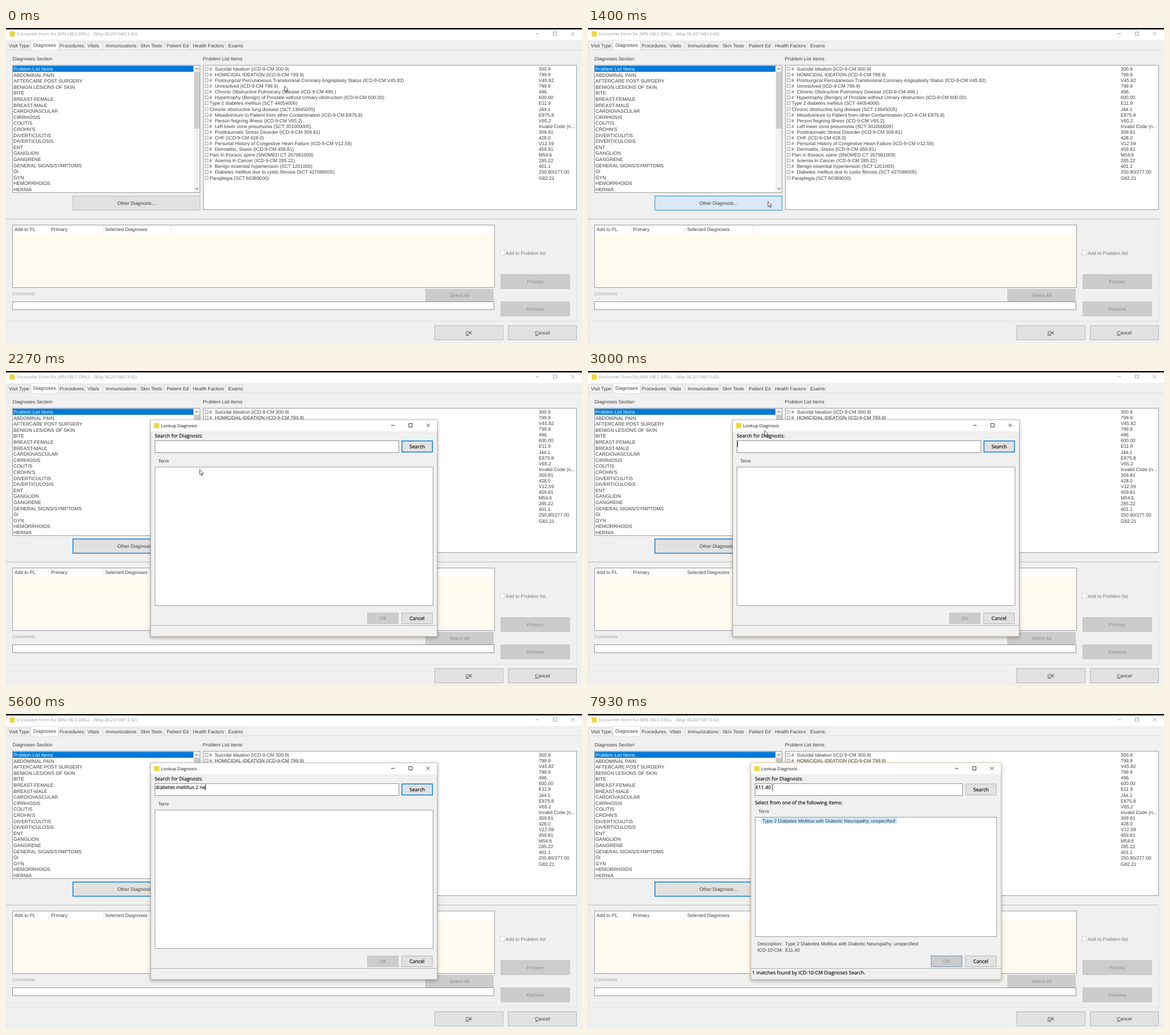
Write an HTML page that moves like this. It is 1011 by 554 pixels and loops after 8000 ms.

```html
<!DOCTYPE html>
<html lang="en">
<head>
<meta charset="utf-8">
<title>Encounter form</title>
<style>
  html, body { margin: 0; width: 100%; height: 100%; overflow: hidden; background: #f0f0f0; }
  svg { display: block; width: 1011px; height: 554px; stroke-width: .8; }
  text { font: 8.4px "Liberation Sans", Arial, sans-serif; fill: #3c3c3c; white-space: pre; text-rendering: geometricPrecision; }
  .ui { font: 8.6px "Open Sans", "Noto Sans", sans-serif; fill: #000; }
  .ui:not(.off) { stroke: #000; stroke-width: .15; }
  .title { font: 7.65px "Open Sans", "Noto Sans", sans-serif; fill: #111; }
  .idle { fill: #999; }
  .caps { font-size: 8.5px; }
  .off { fill: #8c8c8c; }
  .pale { fill: #a6a6a6; }
  .sel { fill: #fff; }
  .mid { text-anchor: middle; }
  .dialog { filter: drop-shadow(0 2px 3px rgba(0, 0, 0, .3)); }
</style>
</head>
<body>
<svg id="stage" viewBox="0 0 1011 554" xmlns="http://www.w3.org/2000/svg"></svg>
<script>
const BLUE = '#0078d7', GREY = '#828790', FACE = '#e1e1e1', EDGE = '#adadad', OFF = '#cccccc';
const LOOP = 8000, STEP = 1000 / 15;

// Shapes are given by their edges: left, top, right, bottom.
const box = (l, t, r, b, fill, stroke = 'none', extra = '') =>
  `<rect x="${l}" y="${t}" width="${r - l}" height="${b - t}" fill="${fill}" stroke="${stroke}" ${extra}/>`;
const text = (x, y, s, cls = '', extra = '') => `<text x="${x}" y="${y}" class="${cls}" ${extra}>${s}</text>`;
const path = (d, stroke, extra = '') => `<path d="${d}" fill="none" stroke="${stroke}" ${extra}/>`;
const button = (l, t, r, b, label, { fill = FACE, edge = EDGE, cls = '', extra = '' } = {}) =>
  box(l + .5, t + .5, r - .5, b - .5, fill, edge, extra) + text((l + r) / 2, (t + b) / 2 + 3, label, 'mid ' + cls);
const disabled = (l, t, r, b, label) => button(l, t, r, b, label, { fill: OFF, edge: '#c2c2c2', cls: 'off' });
const icon = (x, y) => box(x, y, x + 9, y + 9, '#ecd83c');
const controls = (x, y, color) =>
  path(`M${x - 65} ${y}h6M${x - 34} ${y - 3}h6v6h-6zM${x - 3} ${y - 3}l6 6m0-6l-6 6`, color, 'stroke-width=".9"');

const sections = ['Problem List Items', 'ABDOMINAL PAIN', 'AFTERCARE POST SURGERY', 'BENIGN LESIONS OF SKIN', 'BITE',
  'BREAST-FEMALE', 'BREAST-MALE', 'CARDIOVASCULAR', 'CIRRHOSIS', 'COLITIS', "CROHN'S", 'DIVERTICULITIS',
  'DIVERTICULOSIS', 'ENT', 'GANGLION', 'GANGRENE', 'GENERAL SIGNS/SYMPTOMS', 'GI', 'GYN', 'HEMORRHOIDS', 'HERNIA'];

const problems = `# Suicidal Ideation (ICD-9-CM 300.9)|300.9
# HOMICIDAL IDEATION (ICD-9-CM 799.9)|799.9
# Postsurgical Percutaneous Transluminal Coronary Angioplasty Status (ICD-9-CM V45.82)|V45.82
# Unresolved (ICD-9-CM 799.9)|799.9
# Chronic Obstructive Pulmonary Disease (ICD-9-CM 496.)|496.
# Hypertrophy (Benign) of Prostate without Urinary obstruction (ICD-9-CM 600.00)|600.00
Type 2 diabetes mellitus (SCT 44054006)|E11.9
Chronic obstructive lung disease (SCT 13645005)|J44.1
# Misadventure to Patient from other Contamination (ICD-9-CM E875.8)|E875.8
# Person feigning illness (ICD-9-CM V65.2)|V65.2
# Left lower zone pneumonia (SCT 301000005)|Invalid Code (n...
# Posttraumatic Stress Disorder (ICD-9-CM 309.81)|309.81
# CHF (ICD-9-CM 428.0)|428.0
# Personal History of Congestive Heart Failure (ICD-9-CM V12.59)|V12.59
# Dermatitis, Stasis (ICD-9-CM 459.81)|459.81
Pain in thoracic spine (SNOMED CT 267981009)|M54.6
# Anemia In Cancer (ICD-9-CM 285.22)|285.22
# Benign essential hypertension (SCT 1201005)|401.1
# Diabetes mellitus due to cystic fibrosis (SCT 427089005)|250.80/277.00
Paraplegia (SCT 60389000)|G82.21`.split('\n');

const tabs = [['Visit Type', 5, 43], ['Diagnoses', 48, 92], ['Procedures', 94, 139], ['Vitals', 143, 171],
  ['Immunizations', 175, 232], ['Skin Tests', 236, 278], ['Patient Ed', 282, 324],
  ['Health Factors', 328, 385], ['Exams', 390, 417]];

function problemRow(line, i) {
  const y = 72 + i * 10.08, [name, code] = line.split('|'), marked = name[0] === '#';
  return box(349.5, y - 2.8, 354.8, y + 2.5, '#fff', '#777', 'stroke-width=".7"') +
    (marked ? text(357, y + 3, '#', '', 'font-weight="bold"') + text(366.5, y + 3, name.slice(2)) : text(357.5, y + 3, name)) +
    text(935, y + 3, code);
}

function mainWindow() {
  return box(0, 0, 1011, 554, '#f0f0f0') + box(0, 2, 1011, 21, '#fff') + box(0, 0, 1011, 2.5, '#000') +
    icon(6.5, 6) + text(19, 13, 'Encounter Form for JWN VBLS DRILL', 'title idle') +
    text(154, 13, '(May 06,2019@13:42)', 'title idle') + controls(994.5, 10, '#999') +
    path('M.5 24.5H417M.5 24V554M1 38.5H1011', '#d9d9d9') + box(44, 21.5, 92, 39, '#fff', '#d9d9d9') +
    tabs.map(([name, x, end]) => text(x, name === 'Diagnoses' ? 32.5 : 33.5, name) +
      path(`M${end - .5} 24V38`, '#d9d9d9')).join('') +
    text(11.5, 56.5, 'Diagnoses Section') + text(345.5, 56.5, 'Problem List Items') +
    // section list
    box(11.5, 65.5, 340.5, 289.5, '#fff', GREY) + box(12, 66.5, 329, 77, BLUE) +
    sections.map((s, i) => text(13, 75 + i * 10.6, s, i ? 'caps' : 'sel')).join('') +
    box(329.5, 66, 340, 289, '#f0f0f0') + box(330, 77, 340, 177, '#cdcdcd') +
    path('M332.3 73.3l2.7-2.7 2.7 2.7M332.3 281.3l2.7 2.7 2.7-2.7', '#444', 'stroke-width="1"') +
    // problem list
    box(346.5, 65.5, 1001.5, 319.5, '#fff', GREY) + problems.map(problemRow).join('') +
    button(117, 295, 341, 321, 'Other Diagnosis...', { extra: 'id="other"' }) +
    // lower panel
    path('M1 336H1002', '#a9a9a9') + path('M1 515.5H1002V336', '#dcdcdc') +
    box(11.5, 346.5, 857.5, 456.5, '#fffbf0', GREY) + box(12, 347, 857, 361.5, '#fff') +
    path('M75.5 347V361M170.5 347V361M289.5 347V361', '#e0e0e0') +
    text(15, 357, 'Add to PL') + text(79, 357, 'Primary') + text(174, 357, 'Selected Diagnoses') +
    text(11, 469.5, 'Comments', 'pale') + box(11.5, 481.5, 856.5, 495.5, '#fff', '#7a7a7a') +
    box(867.2, 391.5, 874.8, 399.2, '#fff', '#ccc') + text(877, 398.5, 'Add to Problem list', '', 'style="fill:#777"') +
    disabled(736, 459, 856, 481, 'Select All') + disabled(868, 433, 990, 459, 'Primary') +
    disabled(868, 481, 990, 507, 'Remove') +
    button(752, 523, 873, 549, '<tspan text-decoration="underline">O</tspan>K') +
    button(881, 523, 1002, 549, '<tspan text-decoration="underline">C</tspan>ancel');
}

function dialog(id, l, r, frame, searchEdge, body) {
  return `<g id="${id}" class="dialog">` + box(l, 86, r, 467, '#f0f0f0', frame) +
    box(l + .4, 86.4, r - .4, 106, '#fff') + icon(l + 6, 91.5) + text(l + 18, 98.5, 'Lookup Diagnosis', 'title') +
    controls(r - 16, 95.5, '#222') + text(l + 7, 116.7, 'Search for Diagnosis:', 'ui') +
    box(l + 7.5, 122.5, r - 67.5, 143.5, '#fff', '#7a7a7a') +
    button(r - 62.5, 122.5, r - 8, 143, 'Search', { cls: 'ui', ...searchEdge }) +
    button(r - 63, 425, r - 8, 445, 'Cancel', { cls: 'ui' }) +
    path(`M${l} 447.5H${r}`, '#a0a0a0') + body + '</g>';
}

const lookup = dialog('lookup', 254, 757, '#a39a88', { edge: BLUE, extra: 'stroke-width="1.4"' },
  text(267, 161.3, 'Term') + box(261.5, 169, 749.5, 412.5, '#fff', GREY) +
  button(634, 425, 689, 445, 'OK', { fill: OFF, edge: '#bfbfbf', cls: 'ui off' }) +
  text(262.3, 132, '', 'ui', 'id="typed"') + box(262, 123.5, 262.9, 134, '#000', 'none', 'id="caret"') +
  text(256, 458, 'Searching ICD-10-CM Diagnoses...', 'ui', 'id="status"'));

const term = 'Type 2 Diabetes Mellitus with Diabetic Neuropathy, unspecified';
const results = dialog('results', 286, 725, '#d8ad7c', {},
  text(294.3, 132, 'E11.40', 'ui') + text(293, 159.3, 'Select from one of the following items:', 'ui') +
  text(299, 173.7, 'Term') + box(293.5, 181.5, 717.5, 391.5, '#fff', GREY) +
  path('M299 187.5H304', '#999', 'stroke-dasharray="1 .6"') + box(304.5, 182, 542.5, 193, '#cce8ff') +
  text(306, 190.5, term) + text(297.5, 406.5, 'Description:') + text(346, 406.5, term) +
  text(297.5, 417.5, 'ICD-10-CM:') + text(346, 417.5, 'E11.40') +
  button(602, 425, 657, 445, 'OK', { fill: OFF, edge: '#7f9dbb', cls: 'ui off', extra: 'stroke-width="1.2"' }) +
  text(288, 458, '1 matches found by ICD-10-CM Diagnoses Search.', 'ui'));

const pointers =
  '<path id="arrow" d="M0 0v9.6l2.2-2 1.5 3.3 1.4-.6-1.5-3.2h3z" fill="#fff" stroke="#222"/>' +
  path('M-1.8-4.8H-.5L0-4.3.5-4.8H1.8M0-4.3V4.3M-1.8 4.8H-.5L0 4.3.5 4.8H1.8', '#333', 'id="beam"') +
  '<g id="busy"><circle r="4.3" fill="#fff" stroke="#1e90e0" stroke-width="2.2"/>' +
  path('M0-4.3A4.3 4.3 0 0 1 4.3 0', '#7cc4f5', 'stroke-width="2.2"') + '</g>';

document.getElementById('stage').innerHTML = mainWindow() + lookup + results + pointers;
const el = Object.fromEntries([...document.querySelectorAll('[id]')].map(e => [e.id, e]));
const show = (e, on) => e.setAttribute('visibility', on ? 'visible' : 'hidden');

const query = 'diabetes mellitus 2 neuropathy';
// time, letters typed by then
const typing = [[4530, 4], [4600, 8], [4670, 11], [4800, 15], [4870, 18], [5130, 19], [5270, 20], [5600, 22],
  [5800, 23], [6000, 24], [6330, 25], [6400, 26], [6470, 27], [6530, 28], [6600, 29], [6800, 30]];
// time, x, y of the pointer
const route = [[0, 489, 102], [67, 489, 104], [400, 481, 154], [533, 481, 154], [1000, 337, 285.5], [1267, 317, 304],
  [1400, 316, 305], [1800, 316, 305], [2467, 350, 118], [2733, 246, 84], [3000, 310, 104.5], [3333, 323, 116],
  [3400, 325, 122], [3600, 324, 128], [7930, 323.5, 129]];

function pointerAt(t) {
  const i = Math.max(1, route.findIndex(p => p[0] >= t));
  const [a, b] = [route[i - 1], t > route.at(-1)[0] ? route.at(-1) : route[i]];
  const k = Math.min(1, (t - a[0]) / (b[0] - a[0] || 1));
  return [a[1] + (b[1] - a[1]) * k, a[2] + (b[2] - a[2]) * k];
}

function otherButton(t) {
  const hot = t >= 1130, k = Math.min(1, Math.max(0, (t - 1665) / 330));
  const mix = (a, b) => Math.round(a + (b - a) * k);
  const fill = !hot ? FACE : t < 1395 ? '#e5f1fb' : `rgb(${mix(217, 225)},${mix(233, 225)},${mix(247, 225)})`;
  el.other.setAttribute('fill', fill);
  el.other.setAttribute('stroke', hot ? BLUE : EDGE);
  el.other.setAttribute('stroke-width', t >= 1800 ? 1.4 : .8);
}

function draw(now) {
  const t = Math.floor((now % LOOP + 4) / STEP) * STEP + 4;
  const done = t >= 7930, found = t >= 7530, searching = t >= 7600 && !done;
  otherButton(t);

  const letters = typing.reduce((n, [at, count]) => t >= at ? count : n, 0);
  el.typed.textContent = found ? 'E11.40' : query.slice(0, letters);
  const opened = t >= 1665 && !done;
  el.caret.setAttribute('x', 262 + (letters ? el.typed.getComputedTextLength() : 0));
  const lit = t < 2200 || (t >= 2730 && t < 3270) || (t >= 4265 && t < 7330);
  show(el.lookup, opened);
  show(el.typed, opened);
  show(el.caret, opened && lit);
  show(el.status, searching);
  show(el.results, done);

  const [x, y] = pointerAt(t);
  for (const e of [el.arrow, el.beam]) e.setAttribute('transform', `translate(${x} ${y})`);
  el.busy.setAttribute('transform', `translate(322 128.5) rotate(${(t - 7600) * .6})`);
  show(el.arrow, t < 3395);
  show(el.beam, (t >= 3395 && t < 4530) || done);
  show(el.busy, searching);
}

const start = performance.now();
(function tick() {
  draw(performance.now() - start);
  requestAnimationFrame(tick);
})();
</script>
</body>
</html>
```
